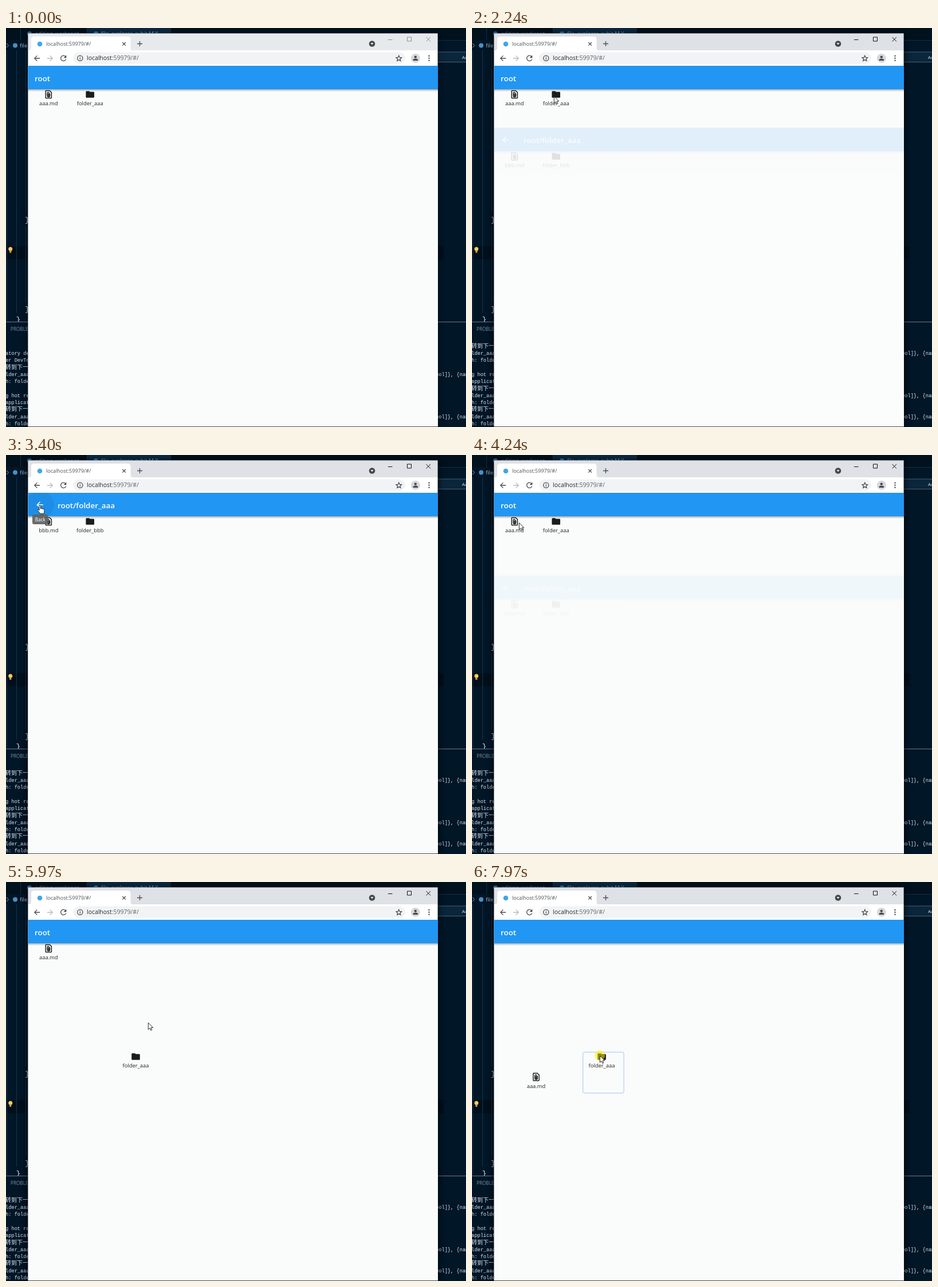
Animation of 803 by 697 pixels, one loop 8 s. Source, as an HTML page:

```html
<!DOCTYPE html>
<html lang="en">
<head>
<meta charset="utf-8">
<title>File explorer drag demo</title>
<style>
html, body { margin: 0; width: 100%; height: 100%; overflow: hidden; background: #011627; }
svg { display: block; font-family: "Open Sans", "Noto Sans", sans-serif; }
.mono { font-family: "Liberation Mono", monospace; font-size: 8.7px; fill: #dfe6ec; white-space: pre; }
.cjk { font-family: "Noto Sans CJK SC", "Noto Sans CJK", sans-serif; font-size: 10px; }
.code { font-family: "Liberation Mono", monospace; font-size: 13px; fill: #d6deeb; }
.label { font-size: 9.4px; fill: #222; text-anchor: middle; }
.title { font-size: 13.4px; font-weight: 600; fill: #fff; }
.line { fill: none; stroke: #4a4d51; stroke-width: 1.3; }
</style>
</head>
<body>
<svg width="803" height="697" viewBox="0 0 803 697">
  <defs>
    <clipPath id="appClip"><rect x="38.5" y="66" width="715.5" height="630"/></clipPath>
    <clipPath id="barClip"><rect x="38.5" y="66" width="715.5" height="41"/></clipPath>
    <filter id="soft" x="-10%" y="-10%" width="120%" height="120%"><feGaussianBlur stdDeviation="6"/></filter>
    <linearGradient id="shade" x1="0" y1="0" x2="0" y2="1">
      <stop offset="0" stop-color="#000" stop-opacity=".32"/>
      <stop offset="1" stop-color="#000" stop-opacity="0"/>
    </linearGradient>
    <path id="arrow" d="M8 -1H-4.17l5.59-5.59L0 -8l-8 8 8 8 1.41-1.41L-4.17 1H8z"/>
    <path id="folder" d="M-2-8h-6c-1.1 0-2 .9-2 2v12c0 1.1.9 2 2 2h16c1.1 0 2-.9 2-2v-10c0-1.1-.9-2-2-2h-8z"/>
    <g id="file" fill="none" stroke="#1c1c1c" stroke-width="2">
      <path d="M2.6-9H-6a1 1 0 0 0-1 1V8a1 1 0 0 0 1 1H6a1 1 0 0 0 1-1V-4.6z"/>
      <path stroke-width="1.8" d="M3.2-2.5V3a3.2 3.2 0 0 1-6.4 0V-3a2.2 2.2 0 0 1 4.4 0V3a1 1 0 0 1-2.2 0V-2.5"/>
    </g>
    <g id="bar">
      <rect x="38" y="107" width="716" height="4" fill="url(#shade)"/>
      <rect x="38" y="66" width="716" height="41" fill="#2196f3"/>
    </g>
  </defs>

  <!-- editor behind the browser -->
  <rect width="803" height="697" fill="#011627"/>
  <rect width="803" height="21" fill="#01111d"/>
  <rect x="142" width="146" height="21" fill="#0b2942"/>
  <path d="M25.5 0V21M141.5 0V21M754 21.5H803" stroke="#15304a"/>
  <g font-size="9.5" fill="#6d8ba8">
    <circle cx="41" cy="10" r="4" fill="#2f6f9f"/>
    <text x="51" y="13">editing_workspot</text>
    <circle cx="157" cy="10" r="4" fill="#2f7fb5"/>
    <text x="166" y="13" fill="#82aad0">file_explorer_cubit M X</text>
    <text x="-3" y="14" fill="#c2433f">t</text>
    <circle cx="16" cy="30.500" r="4" fill="#4a8fc2"/>
    <text x="24" y="34" fill="#a8bccd">file_explorer</text>
  </g>
  <path d="M1 27l3.500 3.500L1 34" fill="none" stroke="#8fa6b9"/>
  <rect x="0" y="381" width="764" height="23" fill="#010f1c"/>
  <path d="M1.500 39V512M18.500 39V497M34.500 39V322M34.500 346V480" stroke="#1a3349"/>
  <g class="code">
    <text x="33" y="338.500">}</text><text x="33" y="494.500">}</text><text x="17.500" y="513">}</text>
  </g>
  <circle cx="7.700" cy="386" r="3.500" fill="#ffcb5c"/>
  <path d="M6 389.500h3.400v3H6z" fill="#d9a63c"/>
  <rect x="740" y="42" width="70" height="17.500" fill="#0b253a" stroke="#43637e"/>
  <text x="796" y="54" font-size="8" fill="#dbe5ee">Aa</text>
  <rect y="513" width="803" height="184" fill="#011627"/>
  <path d="M0 513.500H803" stroke="#5f7e97"/>
  <text x="8" y="529" font-size="8.200" fill="#7d95a8">PROBLEMS</text>
  <g id="logOld" class="mono"></g>
  <g id="logNew" class="mono"></g>

  <!-- browser window -->
  <rect id="shadow" x="36" y="9" width="720" height="692" fill="#000" filter="url(#soft)"/>
  <rect x="38" y="9" width="716" height="688" fill="#3c4a57"/>
  <rect id="strip" x="38.500" y="9.500" width="715" height="30"/>
  <path d="M38.500 39.500c4 0 5.500-2 5.500-5V20c0-3 2-5 5-5h163.500c3 0 5 2 5 5v14.500c0 3 1.500 5 5.500 5z" fill="#fff"/>
  <circle cx="59" cy="28" r="4.300" fill="#42a5e8"/>
  <text x="70" y="31.300" font-size="9" fill="#4d5156">localhost:59979/#/</text>
  <path class="line" d="M203.300 25l5.600 5.600M208.900 25l-5.600 5.600M229 27.500h9M233.500 23v9"/>
  <circle cx="639" cy="27.500" r="5.300" fill="#45484c"/>
  <path d="M636.400 26.200h5.200l-2.600 3z" fill="#fff"/>
  <path id="controls" d="M667 20.500h7.500M700.500 16h7v7h-7zM733.500 16l7.500 7.500M741 16l-7.500 7.500" fill="none"/>
  <rect x="38.500" y="39" width="715" height="27.500" fill="#fff"/>
  <rect x="117" y="42.500" width="580" height="20" rx="10" fill="#f1f3f4"/>
  <use href="#arrow" transform="translate(54 53) scale(.64)" fill="#45484c"/>
  <use href="#arrow" transform="translate(77 53) scale(-.64 .64)" fill="#b6b9bd"/>
  <path class="line" d="M103.800 49.600a4.700 4.700 0 1 0 1 4.800" stroke-width="1.500"/>
  <path d="M105.300 47.500v4.800h-4.800z" fill="#45484c"/>
  <circle class="line" cx="129.300" cy="52.800" r="4.600" stroke-width="1.100"/>
  <path d="M129.300 50v1.200M129.300 52v3.300" stroke="#4a4d51" stroke-width="1.200"/>
  <text x="141" y="56.300" font-size="10.450" fill="#26292c">localhost<tspan fill="#5f6368">:59979/#/</tspan></text>
  <path class="line" stroke-width="1.100" d="M685.800 48.200l1.400 3.200 3.400.3-2.600 2.300.8 3.400-3-1.800-3 1.800.8-3.400-2.600-2.300 3.400-.3z"/>
  <circle cx="714.800" cy="52.800" r="8" fill="#d5d8dc"/>
  <circle cx="714.800" cy="50.600" r="2.200" fill="#45484f"/>
  <path d="M710.500 57v-1c0-3.200 8.600-3.200 8.600 0v1z" fill="#45484f"/>
  <g fill="#45484c"><circle cx="738.500" cy="48.800" r="1.200"/><circle cx="738.500" cy="52.800" r="1.200"/><circle cx="738.500" cy="56.800" r="1.200"/></g>

  <!-- app -->
  <g clip-path="url(#appClip)">
    <rect x="38" y="66" width="716" height="631" fill="#fafbfb"/>
    <use href="#bar"/>
    <text class="title" x="50" y="93.200">root</text>
    <g id="rootFile"></g>
    <g id="rootFolder"></g>
    <g id="sub">
      <rect x="38" y="66" width="716" height="631" fill="#fafbfb"/>
      <use href="#bar"/>
      <circle id="hover" cx="59" cy="87" r="24.500" fill="#000" opacity=".06" clip-path="url(#barClip)"/>
      <use href="#arrow" transform="translate(59 87) scale(.73)" fill="#fff"/>
      <text class="title" x="90" y="93.200">root/folder_aaa</text>
      <g id="subFile"></g>
      <g id="subFolder"></g>
    </g>
    <g id="tip">
      <rect x="46" y="104" width="27.500" height="17" rx="3" fill="#616161" opacity=".93"/>
      <text x="59.800" y="115.600" font-size="8.200" fill="#fff" text-anchor="middle">Back</text>
    </g>
    <rect id="ghost" width="71.500" height="71.500" rx="3" fill="none" stroke="#a3c3f6"/>
  </g>
  <circle id="press" r="9" fill="#fff000" opacity=".55"/>
  <path id="pointer" d="M.3.5V12.300L3 9.800l1.800 4 1.900-.8L5 9h3.700z" fill="#fff" stroke="#111" stroke-width=".9"/>
  <path id="hand" d="M0 1.300C0-.4 2.400-.4 2.400 1.300V5.700c.4-.8 2.200-.6 2.300.4.500-.7 2.100-.4 2.200.6.600-.6 2 0 2 1.100v3.200c0 1-.9 1.900-.9 3.600H1.400c0-1.500-3.600-4.300-4.200-6-.4-1.300 1.200-1.800 2-.8L0 8.800z" fill="#fff" stroke="#111" stroke-width=".9"/>
</svg>
<script>
const LOOP = 8000;
const $ = id => document.getElementById(id);

const place = (id, x, y) => $(id).setAttribute("transform", `translate(${x} ${y})`);
const show = (id, on) => { $(id).style.display = on ? "" : "none"; };

// Grid cells: icon above a centred label
function cell(id, icon, name, x) {
  $(id).innerHTML = `<use href="#${icon}" transform="translate(36 9) scale(.73)" fill="#1c1c1c"/>
    <text class="label" x="36" y="28">${name}</text>`;
  place(id, x, 107);
}
const FILE_X = 38.3, FOLDER_X = 110.7;
cell("rootFile", "file", "aaa.md", FILE_X);
cell("rootFolder", "folder", "folder_aaa", FOLDER_X);
cell("subFile", "file", "bbb.md", FILE_X);
cell("subFolder", "folder", "folder_bbb", FOLDER_X);

// Terminal output; lines count upwards from the bottom row
const visit = ["h: folder_aaa", "lder_aaa", "转到下一层"];
const reload = ["", " application", "g hot restart"];
function log(id, lines) {
  $(id).innerHTML = lines.map((s, i) => {
    const y = 694 - i * 12.3;
    const tail = s === "lder_aaa" ? `<text x="750" y="${y}">ool]}, {name</text>` : "";
    return `<text x="-1" y="${y}" class="${s === visit[2] ? "cjk" : ""}">${s}</text>${tail}`;
  }).join("");
}
const restart = [reload[1], reload[2], reload[0]];
log("logOld", [...visit, ...restart, ...visit, "er DevTools", "atory debug"]);
log("logNew", [...visit, ...visit, ...restart, ...visit]);

// Pointer moves: start, end, number of steps, waypoints
const MOVES = [
  [130, 290, 3, [[638, 589], [520, 485], [432, 407]]],
  [520, 670, 3, [[392, 383], [342, 353], [314, 335]]],
  [820, 1370, 8, [[300, 316], [218, 208], [154, 134], [143, 119]]],
  [2700, 3400, 10, [[142, 123], [112, 127], [72, 104], [57, 88]]],
  [4010, 4720, 10, [[58, 90], [82, 118], [126, 157], [141, 115]]],
  [4870, 5510, 9, [[141, 115], [166, 155], [203, 208], [218, 250], [220, 263.5]]],
  [5810, 6510, 10, [[232, 260], [256, 238], [136, 160], [74, 120]]],
  [6760, 7210, 7, [[74, 120], [82, 170], [101, 256], [112, 304]]],
  [7510, 7830, 5, [[150, 310], [225, 320], [264, 318], [238, 307], [223, 303]]]
];

function along(pts, u) {
  const s = Math.max(0, Math.min(1, u)) * (pts.length - 1);
  const i = Math.min(Math.floor(s), pts.length - 2), f = s - i;
  return pts[i].map((v, k) => v + (pts[i + 1][k] - v) * f);
}

function pointerAt(t) {
  const move = MOVES.filter(m => m[0] <= t).pop();
  if (!move) return null;
  const [start, end, n, pts] = move;
  const step = Math.min(n - 1, Math.floor((t - start) / (end - start) * (n - 1) + .15));
  const now = along(pts, step / (n - 1)), before = along(pts, (step - 1) / (n - 1));
  // The dragged outline trails the pointer a little
  const trail = now.map((v, k) => v - (v - before[k]) * .22);
  return { now, trail };
}

// Drags: press, outline shown, release, pointer's offset inside the cell
const DRAGS = [
  [4870, 4950, 5650, 30, 8],
  [6760, 6835, 7360, 36, 13],
  [7970, 7970, 8000, 33, 7]
];
const CLICKS = [[1840, 1920], [3860, 4010]];
const within = (t, a, b) => t >= a && t < b;

function bezier(x1, y1, x2, y2) {
  const at = (a, b, s) => 3 * (1 - s) * (1 - s) * s * a + 3 * (1 - s) * s * s * b + s ** 3;
  return x => {
    let lo = 0, hi = 1;
    for (let i = 0; i < 24; i++) {
      const mid = (lo + hi) / 2;
      if (at(x1, x2, mid) < x) lo = mid; else hi = mid;
    }
    return at(y1, y2, (lo + hi) / 2);
  };
}
const slide = bezier(.4, 0, .2, 1), fade = bezier(.42, 0, 1, 1);
const hold = (t, ticks) => ticks.filter(k => k <= t).pop();

function subPage(t) {
  if (t < 2150) return 0;
  const p = t < 4010
    ? (hold(t, [2150, 2240, 2300, 2380, 2450, 2700]) - 2156) / 300
    : 1 - (hold(t, [4010, 4090, 4160, 4240, 4340]) - 3989) / 300;
  return Math.max(0, Math.min(1, p));
}

function draw(t) {
  const active = t >= 1840;
  $("strip").setAttribute("fill", active ? "#dee1e6" : "#e7eaed");
  $("controls").setAttribute("stroke", active ? "#111" : "#8b8e91");
  $("shadow").setAttribute("opacity", active ? .6 : .3);
  show("logOld", t < 2070);
  show("logNew", t >= 2070);

  const p = subPage(t);
  show("sub", p > 0);
  place("sub", 0, 157.5 * (1 - slide(p)));
  $("sub").setAttribute("opacity", p < 1 ? fade(p) : 1);
  show("hover", within(t, 3150, 4010));
  show("tip", within(t, 3240, 3860));

  place("rootFolder", ...(t < 5650 ? [FOLDER_X, 107] : [190.5, 296]));
  place("rootFile", ...(t < 7360 ? [FILE_X, 107] : [76, 331.5]));

  const at = pointerAt(t);
  const drag = DRAGS.find(d => within(t, d[0], d[2]));
  const pressed = drag || CLICKS.some(c => within(t, ...c));
  const onBack = at && within(t, 2700, 4090) && at.now[0] < 83 && at.now[1] < 107;
  show("pointer", at && !onBack);
  show("hand", onBack);
  show("press", pressed);
  show("ghost", drag && t >= drag[1]);
  if (!at) return;
  const [x, y] = at.now;
  place("pointer", x, y);
  place("hand", x + 1, y);
  place("press", x, y);
  if (drag) place("ghost", at.trail[0] - drag[3] + .3, at.trail[1] - drag[4] + .3);
}

const begin = performance.now();
function tick() {
  draw((performance.now() - begin) % LOOP);
  requestAnimationFrame(tick);
}
tick();
</script>
</body>
</html>
```
